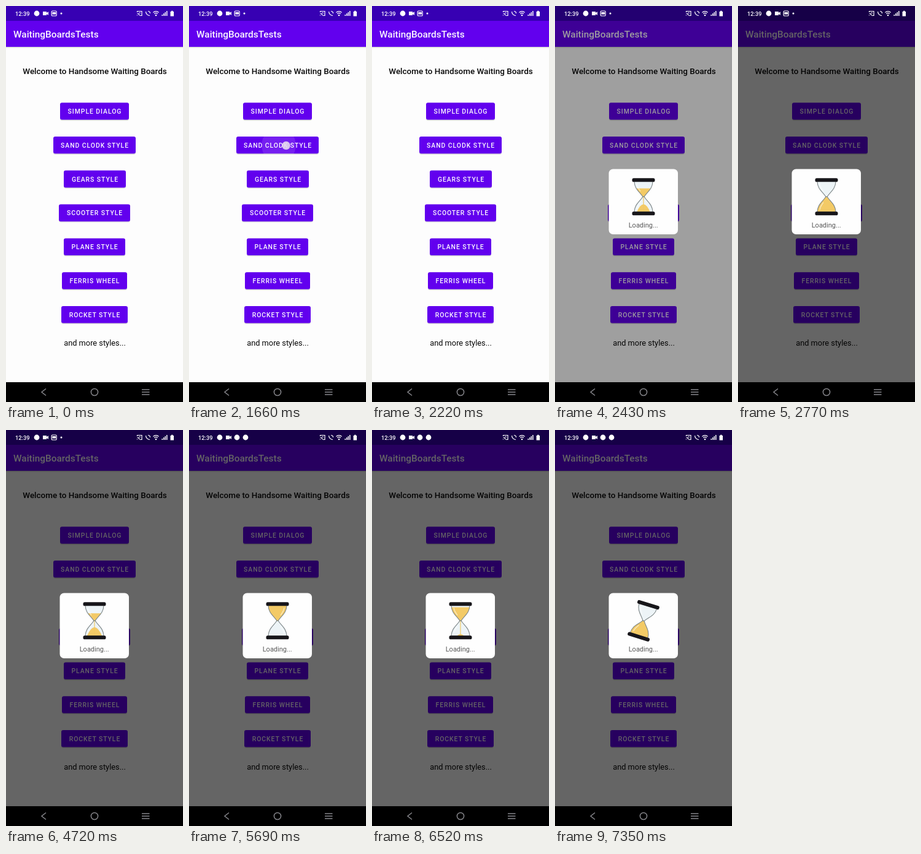
An HTML page that plays this animation: 288x640 px, repeating every 7420 ms.

```html
<!DOCTYPE html>
<html lang="en">
<head>
<meta charset="utf-8">
<title>Hourglass dialog</title>
<style>
html, body { margin: 0; width: 100%; height: 100%; overflow: hidden; background: #fdfdfd; }
svg { display: block; width: 288px; height: 640px; font-family: Roboto, "Open Sans", sans-serif; }
text { white-space: pre; }
.title { fill: #fbf8fe; font-size: 15.4px; font-weight: 500; }
.btn { fill: #6200ee; }
.label { fill: #fbf8fe; font-size: 10.45px; font-weight: 500; letter-spacing: .93px; }
.ink { fill: #080808; }
.shade { fill: #000; opacity: .14; }
.mid { text-anchor: middle; }
.icon { fill: #fff; }
.line { fill: none; stroke: #fff; stroke-width: 1.2; }
.nav { fill: none; stroke: #85858a; stroke-width: 1.5; }
</style>
</head>
<body>
<svg id="stage" viewBox="0 0 288 640" xmlns="http://www.w3.org/2000/svg">
  <defs>
    <path id="bulb" d="M-15 -25 C-15 -12 -5 -7 -1.2 0 H1.2 C5 -7 15 -12 15 -25 Z"/>
    <clipPath id="upper"><use href="#bulb"/></clipPath>
    <clipPath id="lower"><use href="#bulb" transform="scale(1 -1)"/></clipPath>
    <clipPath id="pressed"><rect x="77" y="211" width="134" height="28" rx="3"/></clipPath>
  </defs>

  <rect width="288" height="640" fill="#fdfdfd"/>
  <rect class="shade" y="66" width="288" height="1.5"/>
  <rect y="24" width="288" height="42" fill="#6200ee"/>
  <rect width="288" height="24" fill="#3700b3"/>
  <text class="title" x="12" y="51">WaitingBoardsTests</text>
  <text class="ink mid" x="144.5" y="110" font-size="13.45" font-weight="500">Welcome to Handsome Waiting Boards</text>
  <g id="buttons"></g>
  <text class="ink mid" x="144.5" y="549" font-size="12.8">and more styles...</text>

  <g id="touch">
    <circle id="ripple" cx="146" cy="225" fill="#fff" opacity=".12" clip-path="url(#pressed)"/>
    <circle cx="158" cy="225.5" r="6.8" fill="#e4d6ee" opacity=".9"/>
  </g>

  <rect id="dim" width="288" height="640"/>

  <!-- status icons -->
  <text class="icon" x="15" y="15.6" font-size="9.3" font-weight="500">12:39</text>
  <circle class="icon" cx="50" cy="12" r="4.4"/>
  <path class="icon" d="M60 9h6v2l3-1.700v5.400l-3-1.700v2h-6z"/>
  <g id="early">
    <rect class="line" x="74.200" y="8" width="8" height="8" rx="1.600"/>
    <path class="icon" d="M75.500 10h5.500v3.500h-5.500z"/>
    <circle class="icon" cx="90" cy="12" r="1.500"/>
  </g>
  <g id="late">
    <circle class="icon" cx="78" cy="12" r="4.400"/>
    <circle class="icon" cx="92" cy="12" r="4.400"/>
  </g>
  <path class="line" d="M213.500 10V8.500H221V15.500H218M213.500 12a3.500 3.500 0 0 1 3.500 3.500M213.500 14.500v1M216 11h3"/>
  <path class="line" stroke-width="2" d="M227.500 9c0 3.500 3 6.500 6.500 6.500M231 8.500a3.500 3.500 0 0 1 3.500 3.500"/>
  <path class="line" d="M239.500 10.500a6.500 6.500 0 0 1 9 0M241.300 12.700a4 4 0 0 1 5.400 0"/>
  <circle class="icon" cx="244" cy="15" r="1.300"/>
  <path class="icon" d="M253.500 14h1.500v2h-1.500zM256 12h1.500v4h-1.500zM258.500 10h1.500v6h-1.500zM261 8h1.500v8h-1.500z"/>
  <path class="icon" d="M267.500 9h1.500v-1.200h2.500V9h1.500v7.500h-5.500z"/>

  <rect y="608" width="288" height="32"/>
  <path class="nav" d="M65 618.500l-7 5.500 7 5.500M221 620h12.500M221 624h12.500M221 628h12.500"/>
  <circle class="nav" cx="144" cy="624" r="5.600"/>

  <g id="dialog">
    <rect x="87.500" y="263.500" width="112.500" height="105.500" rx="7" fill="#fefefe"/>
    <text class="mid" x="143.700" y="358" font-size="11" fill="#585858">Loading...</text>
    <g id="glass">
      <g fill="#edf4f7">
        <use href="#bulb"/>
        <use href="#bulb" transform="scale(1 -1)"/>
      </g>
      <g fill="#f3ca66">
        <path id="top" clip-path="url(#upper)"/>
        <path id="pile" clip-path="url(#lower)"/>
      </g>
      <path id="stream" d="M0 -2V24" stroke="#f0c964" stroke-width="1.200"/>
      <g fill="none" stroke="#7d8688" stroke-width="1.100">
        <use href="#bulb"/>
        <use href="#bulb" transform="scale(1 -1)"/>
      </g>
      <path d="M-11 -21C-10 -15 -7 -12 -5 -9M-11 21C-10 15 -7 12 -5 9" fill="none" stroke="#fff" stroke-width="1.300" opacity=".6"/>
      <g fill="#17161a">
        <rect x="-18.500" y="-30" width="37" height="6" rx="2.600"/>
        <rect x="-18.500" y="24" width="37" height="6" rx="2.600"/>
      </g>
    </g>
  </g>
</svg>
<script>
const LOOP = 7420;
const TAP = 1660, TAP_END = 2010, OPEN = 2290, NOTICE = 5200;
const CYCLE = 2240, FULL_AT = 3560, FLOW = 1440, FLIP_AT = 1455, FLIP = 500;

const $ = id => document.getElementById(id);
const clamp = v => Math.max(0, Math.min(1, v));
const span = (t, start, length) => clamp((t - start) / length);
const ease = p => p * p * (3 - 2 * p);
const show = (id, on) => { $(id).style.display = on ? "" : "none"; };

const buttons = [
  ["SIMPLE DIALOG", 88, 112], ["SAND CLODK STYLE", 77, 134], ["GEARS STYLE", 94, 101],
  ["SCOOTER STYLE", 86, 116], ["PLANE STYLE", 94, 100], ["FERRIS WHEEL", 91, 106],
  ["ROCKET STYLE", 90, 108]
];
$("buttons").innerHTML = buttons.map(([label, x, w], i) => {
  const y = 156.2 + i * 54.8;
  return `<rect class="shade" x="${x}" y="${y + 1}" width="${w}" height="28" rx="3"/>
    <rect class="btn" x="${x}" y="${y}" width="${w}" height="27.6" rx="3"/>
    <text class="label mid" x="${x + w / 2 + .5}" y="${y + 17.7}">${label}</text>`;
}).join("");

function drawGlass(t) {
  const c = ((t - FULL_AT) % CYCLE + CYCLE) % CYCLE;
  const flow = span(c, 0, FLOW);
  const fallen = flow ** 3;
  const level = -25 * (1 - fallen);
  const half = 6 + 24 * fallen ** 2;
  const turn = 180 * ease(span(c, FLIP_AT, FLIP));
  $("top").setAttribute("d", `M-16 ${level}H16V0H-16Z`);
  $("pile").setAttribute("d", `M${-half} 25Q0 ${25 - 56 * fallen} ${half} 25Z`);
  show("top", flow < 1);
  show("stream", flow > 0 && flow < 1);
  $("glass").setAttribute("transform", `translate(144 308.3) rotate(${turn})`);
}

function draw(t) {
  $("dim").style.opacity = .6 * span(t, OPEN, 225);
  show("touch", t >= TAP && t < TAP_END);
  $("ripple").setAttribute("r", 28 + 70 * span(t, TAP, TAP_END - TAP));
  show("early", t < NOTICE);
  show("late", t >= NOTICE);
  $("dialog").style.opacity = span(t, OPEN, 120);
  drawGlass(t);
}

let start;
function tick(now) {
  start ??= now;
  draw((now - start) % LOOP);
  requestAnimationFrame(tick);
}
draw(0);
requestAnimationFrame(tick);
</script>
</body>
</html>
```
